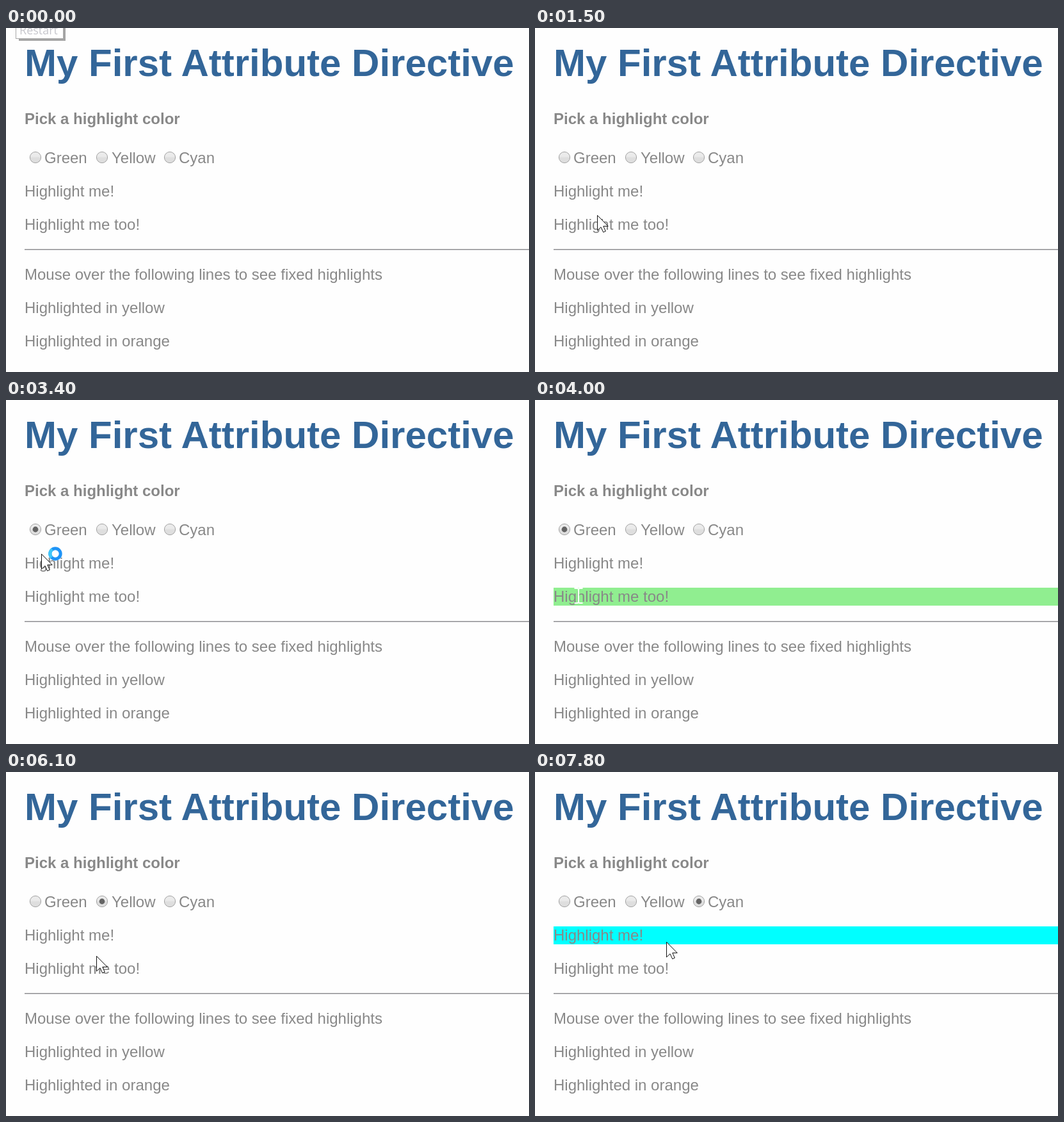
An HTML page for the animation above (8 s loop, 817 px wide and 537 px high).

```html
<!DOCTYPE html>
<html lang="en">
<head>
<meta charset="utf-8">
<title>Highlight directive</title>
<style>
  html, body { margin: 0; width: 100%; height: 100%; overflow: hidden; background: #fefefe; }
  svg { display: block; width: 817px; height: 537px; }
  text { font-family: "Liberation Sans", Arial, sans-serif; font-size: 24px; fill: #888; white-space: pre; }
  .title { font-size: 60px; font-weight: bold; fill: #369; }
  .head { font-weight: bold; }
  .tip text { font: 18px "Open Sans", "Noto Sans", sans-serif; fill: #c6c6cc; }
  .radio circle:first-child { fill: url(#idle); stroke: #a3a3a3; }
  .radio.hover circle:first-child { fill: url(#over); stroke: #8a8a8a; }
  .radio.press circle:first-child { fill: url(#down); stroke: #8a8a8a; }
  .dot { fill: #646464; visibility: hidden; }
  .on .dot { visibility: visible; }
</style>
</head>
<body>
<svg viewBox="0 0 817 537">
  <defs>
    <linearGradient id="idle" x2="0" y2="1">
      <stop offset=".4" stop-color="#ebebeb"/><stop offset=".55" stop-color="#dedede"/>
    </linearGradient>
    <linearGradient id="over" x2="0" y2="1">
      <stop offset=".4" stop-color="#f1f1f1"/><stop offset=".55" stop-color="#e5e5e5"/>
    </linearGradient>
    <linearGradient id="down" x2="0" y2="1">
      <stop offset=".3" stop-color="#dadada"/><stop offset="1" stop-color="#e6e6e6"/>
    </linearGradient>
  </defs>

  <rect class="line" x="29" y="241" width="788" height="28" fill="none"/>
  <rect class="line" x="29" y="293" width="788" height="28" fill="none"/>

  <text class="title" x="29" y="75">My First Attribute Directive</text>
  <text class="head" x="29" y="150">Pick a highlight color</text>

  <g class="radio" transform="translate(46 202)"><circle r="8.6"/><circle class="dot" r="4.4"/></g>
  <text x="60" y="211">Green</text>
  <g class="radio" transform="translate(150 202)"><circle r="8.6"/><circle class="dot" r="4.4"/></g>
  <text x="165" y="211">Yellow</text>
  <g class="radio" transform="translate(256 202)"><circle r="8.6"/><circle class="dot" r="4.4"/></g>
  <text x="270" y="211">Cyan</text>

  <text x="29" y="263">Highlight me!</text>
  <text x="29" y="315">Highlight me too!</text>
  <path d="M29 345.5H817" stroke="#8c8c90"/>
  <path d="M29 346.5H817" stroke="#c8c8ca"/>
  <text x="29" y="393">Mouse over the following lines to see fixed highlights</text>
  <text x="29" y="445">Highlighted in yellow</text>
  <text x="29" y="497">Highlighted in orange</text>

  <g class="tip" id="tip">
    <path d="M20 18.5H91.5V-2" fill="none" stroke="#a4a4a4" stroke-width="3"/>
    <rect x="15.5" y="-12.5" width="74" height="29" fill="#fff" stroke="#a8a8a8"/>
    <text x="21" y="10">Restart</text>
  </g>

  <g id="arrow">
    <path d="M.5.5V24L6 18.8 9.7 26.8 13.3 25.2 9.8 17.4H17.2Z" fill="#fff" stroke="#111"/>
    <g id="busy" fill="none" transform="translate(22 0)">
      <circle r="10.8" fill="#fff"/>
      <circle r="8.2" stroke="#1f93f6" stroke-width="5"/>
      <path d="M-5.8 5.8A8.2 8.2 0 0 1-4.7-6.7" stroke="#3fc6f8" stroke-width="5"/>
    </g>
  </g>
  <path id="beam" d="M-6.5-12H-2Q0-12 0-10Q0-12 2-12H6.5M0-10V9M-6.5 11H-2Q0 11 0 9Q0 11 2 11H6.5"
        fill="none" stroke="#fff" stroke-width="2"/>
</svg>
<script>
  const LOOP = 8000, STEP = 100;

  // Pointer path: time, x, y
  const path = [
    [0, 16, -40], [100, 16, -28], [500, 60, 120], [800, 92, 246], [900, 95, 255], [1000, 95, 255],
    [1400, 97, 281], [1500, 97, 292], [1800, 95, 306], [1900, 95, 306],
    [2000, 96, 290], [2100, 95, 252], [2200, 94, 225], [2300, 94, 225], [2800, 50, 208], [3200, 50, 208],
    [3400, 55, 240], [3500, 60, 250], [3600, 62, 255], [3700, 62, 255],
    [3800, 65, 272], [3900, 68, 295], [4000, 68, 306], [4300, 68, 306],
    [4600, 80, 280], [4800, 100, 258], [5200, 148, 208], [5400, 148, 208],
    [5500, 150, 254], [5600, 150, 254], [5900, 150, 256], [6000, 150, 256],
    [6100, 141, 287], [6200, 142, 300], [6400, 148, 306], [6600, 180, 282], [6900, 252, 212],
    [7100, 252, 206], [7500, 252, 206], [7800, 205, 265], [8000, 205, 265]
  ];
  const radios = [
    { x: 46, press: 2800, pick: 3000, color: "#90ee90" },
    { x: 150, press: 5200, pick: 5400, color: "#ff0" },
    { x: 256, press: 7300, pick: 7400, color: "#0ff" }
  ];
  const lines = [
    { top: 241, color: "#f00" },
    { top: 293, color: "#ee82ee" }
  ];
  // Selectable text: top, bottom, right edge
  const zones = [[20, 89, 796], [129, 157, 272], [241, 269, 169], [293, 321, 209]];

  const byId = id => document.getElementById(id);
  const radioEls = document.querySelectorAll(".radio");
  const lineEls = document.querySelectorAll(".line");
  const arrow = byId("arrow"), beam = byId("beam"), busy = byId("busy"), tip = byId("tip");

  function pointerAt(t) {
    const i = path.findIndex(p => p[0] > t);
    const [t0, x0, y0] = path[i - 1], [t1, x1, y1] = path[i];
    const k = (t - t0) / (t1 - t0);
    return [Math.round(x0 + (x1 - x0) * k), Math.round(y0 + (y1 - y0) * k)];
  }

  function show(el, visible) {
    el.setAttribute("visibility", visible ? "visible" : "hidden");
  }

  function draw(t) {
    const [x, y] = pointerAt(t);
    const picked = radios.filter(r => t >= r.pick).pop();

    radios.forEach((r, i) => {
      const list = radioEls[i].classList;
      list.toggle("on", r === picked);
      list.toggle("hover", Math.hypot(x - r.x, y - 202) < 9);
      list.toggle("press", t >= r.press && t < r.pick);
    });

    lines.forEach((l, i) => {
      const over = y >= l.top && y < l.top + 28 && x >= 29;
      lineEls[i].setAttribute("fill", over ? (picked || l).color : "none");
    });

    const onText = zones.some(([top, bottom, right]) => y >= top && y < bottom && x >= 29 && x < right);
    const place = `translate(${x} ${y})`;
    arrow.setAttribute("transform", place);
    beam.setAttribute("transform", place);
    show(beam, onText);
    arrow.setAttribute("display", onText ? "none" : "inline");
    show(busy, t >= 3000 && t < 3500);
    tip.setAttribute("opacity", t < 100 ? 1 : t < 200 ? 0.45 : 0);
  }

  const start = performance.now();
  function tick() {
    const t = (performance.now() - start) % LOOP;
    draw(Math.floor(t / STEP) * STEP);
    requestAnimationFrame(tick);
  }
  tick();
</script>
</body>
</html>
```
